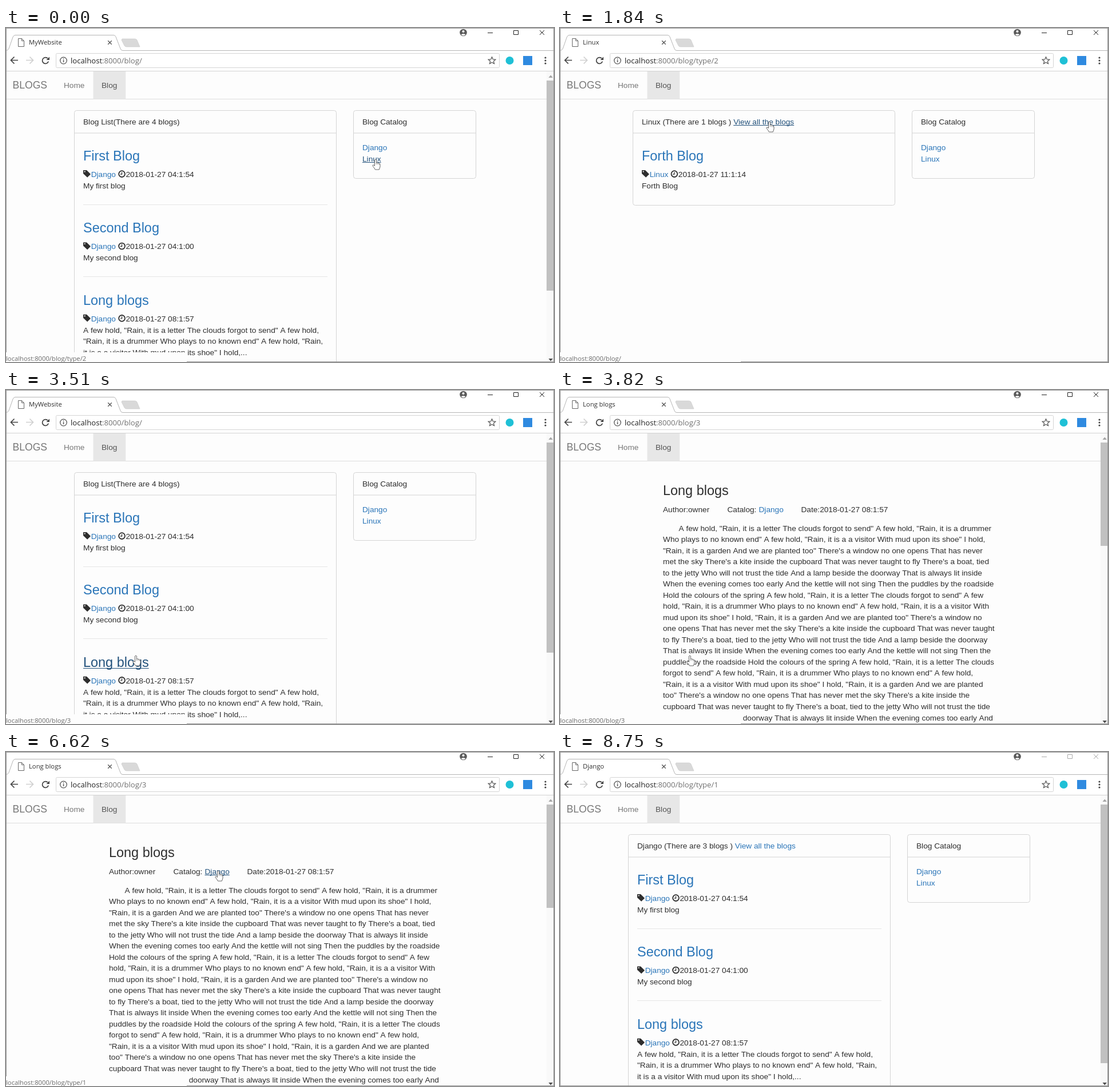
Recreate the animation shown at these times as an HTML page with a canvas. Size 958 by 585 pixels, loop 8850 ms.

```html
<!DOCTYPE html>
<html lang="en">
<head>
<meta charset="utf-8">
<title>Blog walkthrough</title>
<style>
html, body { margin: 0; width: 100%; height: 100%; overflow: hidden; background: #fdfdfd; }
canvas { display: block; }
</style>
</head>
<body>
<canvas id="stage" width="958" height="585"></canvas>
<script>
const ctx = document.getElementById('stage').getContext('2d');
const LOOP = 8850, BASE = 13.67, LINE = 19.53, BG = '#fdfdfd';
const INK = '#2e2e2e', LINK = '#2a75b8', HOVER = '#23527c', BORDER = '#d4d4d4';
const WEB = '"Liberation Sans", Arial, sans-serif', UI = '"Open Sans", sans-serif';
const HOST = 'localhost:8000', LOADING = 'Connecting...';

const verse = 'A few hold, "Rain, it is a letter The clouds forgot to send" A few hold, ' +
  '"Rain, it is a drummer Who plays to no known end" A few hold, "Rain, it is a a visitor ' +
  'With mud upon its shoe" I hold, "Rain, it is a garden And we are planted too" There\'s a ' +
  'window no one opens That has never met the sky There\'s a kite inside the cupboard That was ' +
  'never taught to fly There\'s a boat, tied to the jetty Who will not trust the tide And a lamp ' +
  'beside the doorway That is always lit inside When the evening comes too early And the kettle ' +
  'will not sing Then the puddles by the roadside Hold the colours of the spring';

// Timelines: [start, value...], the latest started row counts.
const pages = [[0, 'list'], [140, 'linux'], [2390, 'list'], [3820, 'article'], [6890, 'django']];
const statuses = [
  [0, HOST + '/blog/type/2', 1], [450, HOST + '/blog/type/2', .5], [630, '', 0],
  [1710, HOST + '/blog/', 1], [1960, LOADING, 1], [2550, '', 0],
  [3510, HOST + '/blog/3', 1], [4070, HOST + '/blog/3', .5], [4260, '', 0],
  [6500, HOST + '/blog/type/1', 1], [6630, LOADING, 1], [7317, '', 0]
];
const hovers = [[0, 'Linux'], [1043, ''], [1710, 'View all the blogs'], [2390, ''],
  [3510, 'Long blogs'], [3820, ''], [6220, 'Django'], [6890, '']];
const pointers = [[0, hand], [910, arrow], [1710, hand], [2390, arrow], [3510, hand],
  [4680, beam], [5400, arrow], [6220, hand], [7170, arrow]];
// Pointer moves: [start, end, steps, points]
const moves = [
  [0, 1, 1, [[646, 230]]],
  [910, 1840, 8, [[611, 226], [490, 200], [366, 164]]],
  [2390, 3360, 7, [[366, 164], [300, 325], [227, 465]]],
  [4680, 5560, 7, [[240, 438], [266, 340], [215, 215], [150, 138]]],
  [5710, 6220, 5, [[186, 138], [300, 172], [371, 208]]],
  [7170, 8200, 8, [[395, 225], [620, 400], [880, 592]]]
];
const last = (rows, t) => rows.filter(r => r[0] <= t).pop();

function pointerAt(t) {
  const [start, end, steps, pts] = last(moves, t);
  if (pts.length < 2) return pts[0];
  const step = Math.min(steps - 1, Math.floor((t - start) / (end - start) * (steps - 1) + .001));
  const s = step / (steps - 1) * (pts.length - 1);
  const i = Math.min(pts.length - 2, Math.floor(s));
  return pts[i].map((v, k) => v + (pts[i + 1][k] - v) * (s - i));
}

// Drawing helpers
function text(s, x, y, color = INK, size = BASE, family = WEB) {
  ctx.font = `${size}px ${family}`;
  ctx.fillStyle = color;
  ctx.fillText(s, x, y);
  return x + ctx.measureText(s).width;
}
function link(s, x, y, hovered, size = BASE) {
  const end = text(s, x, y, hovered ? HOVER : LINK, size);
  if (hovered) fill(HOVER, x, Math.round(y + size * .1), end - x, 1);
  return end;
}
function fill(color, x, y, w, h) {
  ctx.fillStyle = color;
  ctx.fillRect(x, y, w, h);
}
function shape(d, x, y, fillColor, strokeColor, width = 1) {
  const path = new Path2D(d);
  ctx.save();
  ctx.translate(x, y);
  if (fillColor) { ctx.fillStyle = fillColor; ctx.fill(path); }
  if (strokeColor) { ctx.strokeStyle = strokeColor; ctx.lineWidth = width; ctx.stroke(path); }
  ctx.restore();
}
function circle(x, y, r, fillColor, strokeColor, width = 1, from = 0, to = 7) {
  ctx.beginPath();
  ctx.arc(x, y, r, from, Math.min(to, from + 2 * Math.PI));
  if (fillColor) { ctx.fillStyle = fillColor; ctx.fill(); }
  if (strokeColor) { ctx.strokeStyle = strokeColor; ctx.lineWidth = width; ctx.stroke(); }
}
function box(x, y, w, h, r) {
  ctx.beginPath();
  ctx.roundRect(x, y, w, h, r);
  ctx.strokeStyle = BORDER;
  ctx.lineWidth = 1;
  ctx.stroke();
}
function wrap(s, width, indent = 0) {
  ctx.font = `${BASE}px ${WEB}`;
  const lines = [];
  let line = '', room = width - indent;
  for (const word of s.split(' ')) {
    const next = line ? line + ' ' + word : word;
    if (ctx.measureText(next).width > room) {
      lines.push(line);
      line = word;
      room = width;
    } else line = next;
  }
  return [...lines, line];
}
const excerpt = wrap(verse.slice(0, 191) + '...', 427);
const article = wrap(Array(4).fill(verse).join(' '), 580, 27.5).slice(0, 18);

// Pointers
function arrow(x, y) {
  shape('M.5 .5V13.5L3.4 10.8L5.6 15.4L7.4 14.6L5.3 10H9.2Z', x, y, '#fff', '#555', .9);
}
function hand(x, y) {
  shape('M-1.5 9V1Q0 -1 1.4 1V6Q3 5 4 6.6Q5.6 5.8 6.4 7.3Q8 7 8 9V13L6.3 18H-.6' +
    'Q-2 15-5 11.5Q-5 9.2-3 10L-1.5 11.5Z', x, y, '#fff', '#555', .9);
  shape('M1.4 6V9M4 6.6V9.4M6.4 7.3V9.6', x, y, null, '#777', .8);
}
function beam(x, y) {
  shape('M-3-7.5H3M0-7.5V7.5M-3 7.5H3', x, y, null, '#555');
}

// Browser window
function chrome(title, path, loading, inactive) {
  fill('#fff', 0, 0, 958, 76);
  shape('M0 39.5Q4 39 5 36L12 16Q13.5 12.5 16 12.5H188Q191 12.5 192 15.5L200 36' +
    'Q201 39.5 204 39.5H958', 0, 0, null, '#b5b5b5');
  shape('M203 19H225Q228 19 229 21L234 33H211Q208 33 207 31L202 21Z', 0, 0, '#d9d9d9', '#c8c8c8', .6);
  if (loading) circle(26, 25, 5.5, null, '#888', 1.6, -loading, 3.6 - loading);
  else shape('M21.5 18.5H27.5L31.5 22.5V32.5H21.5ZM27.5 18.5V22.5H31.5', 0, 0, '#fff', '#666');
  text(title, 40, 29, INK, 11.25, UI);
  shape('M-3.3-3.3L3.3 3.3M3.3-3.3L-3.3 3.3', 181.5, 25.5, null, '#555', 1.3);

  const frame = inactive ? '#aaa' : '#222';
  circle(799.5, 8, 6.3, '#5a5a5a');
  circle(799.5, 6, 2.1, '#fff');
  shape('M-4 3.8Q0 .2 4 3.8Q0 7 -4 3.8Z', 799.5, 8, '#fff');
  shape('M842 8.5H851M887.5 4.5H895.5V11.5H887.5ZM933 4L941 12M941 4L933 12', 0, 0, null, frame);

  shape('M21 56.5H9M14.5 50.5L8.5 56.5L14.5 62.5', 0, 0, null, '#444', 1.7);
  shape('M35 56.5H47M41.5 50.5L47.5 56.5L41.5 62.5', 0, 0, null, '#d0d0d0', 1.7);
  circle(69, 57, 5.4, null, '#444', 1.7, .3, 5.5);
  shape('M76 50.5V56H70.5Z', 0, 0, '#444');
  box(87.5, 44.5, 775, 25, 2);
  circle(100.5, 57, 5.8, null, '#555', 1.3);
  fill('#555', 99.8, 56, 1.5, 4);
  fill('#555', 99.8, 53.4, 1.5, 1.5);
  text(path, text(HOST.slice(0, 9), 113, 61.5, '#222', 13.15, UI), 61.5, '#717171', 13.15, UI);
  shape('M0-6.3L1.8-2.1L6.3-1.8L2.9 1.2L4 5.6L0 3.2L-4 5.6L-2.9 1.2L-6.3-1.8L-1.8-2.1Z',
    849.5, 57, null, '#555', 1.2);
  circle(880.5, 57, 7, '#1fc0d6');
  fill('#2f8ae0', 904, 49, 16, 16);
  for (const y of [52, 57, 62]) circle(943, y, 1.6, '#444');
  fill('#d2d2d2', 0, 75, 958, 1);
}

function scrollbar(bottom) {
  fill('#f9f9f9', 945, 76, 12, 508);
  fill('#c1c1c1', 945, 92, 12, bottom - 92);
  shape('M948.5 87H956L952.2 82.5Z', 0, 0, '#a5a5a5');
  shape('M948.5 579H956L952.2 583.5Z', 0, 0, '#505050');
}

function navbar() {
  fill('#dedede', 0, 124, 958, 1);
  fill('#e7e7e7', 152.5, 76, 56.7, 48.5);
  text('BLOGS', 11.5, 106, '#777', 17.58);
  text('Home', 101, 105, '#777');
  text('Blog', 167, 105, '#555');
}

// Pages
function post(x, y, title, tag, date, body, hover) {
  link(title, x, y, hover === title, 23.44);
  shape('M0 0H6L13 7L7.2 12.8L0 6Z', x, y + 17, INK);
  circle(x + 2.7, y + 19.6, 1.1, BG);
  const end = link(tag, x + 13.67, y + 29) + 3.8;
  circle(end + 6.8, y + 23.6, 5.4, null, INK, 1.8);
  shape('M0-3.4V.6H-2.8', end + 6.8, y + 23.6, null, INK, 1.2);
  text(date, end + 13.67, y + 29);
  body.forEach((line, i) => text(line, x, y + 49 + i * LINE));
}

function listPage(x, heading, all, posts, bottom, hover) {
  box(x - 15.5, 144.5, 458, bottom - 144.5, 4);
  fill(BORDER, x - 15, 183.5, 457, 1);
  const end = text(heading, x, 169);
  if (all) link('View all the blogs', end, 169, hover === 'View all the blogs');
  posts.forEach((p, i) => {
    const y = 232 + i * 126.4;
    post(x, y, ...p, hover);
    if (i < posts.length - 1) fill('#e6e6e6', x, Math.round(y + 77), 427, 1);
  });
  box(x + 472.5, 144.5, 214, 119, 4);
  fill(BORDER, x + 473, 183.5, 213, 1);
  text('Blog Catalog', x + 488, 169);
  link('Django', x + 488, 214);
  link('Linux', x + 488, 233.5, hover === 'Linux');
}

function articlePage(hover) {
  text('Long blogs', 180, 184, INK, 23.44);
  text('Author:owner', 180, 213.5);
  text('Catalog:', 292.5, 213.5);
  link('Django', 347.5, 213.5, hover === 'Django');
  text('Date:2018-01-27 08:1:57', 421.5, 213.5);
  article.forEach((line, i) => text(line, i ? 180 : 207.5, 246.5 + i * LINE));
}

const posts = [
  ['First Blog', 'Django', '2018-01-27 04:1:54', ['My first blog']],
  ['Second Blog', 'Django', '2018-01-27 04:1:00', ['My second blog']],
  ['Long blogs', 'Django', '2018-01-27 08:1:57', excerpt]
];
const forth = [['Forth Blog', 'Linux', '2018-01-27 11:1:14', ['Forth Blog']]];

// Tab title, path, scrollbar end, content
const views = {
  list: ['MyWebsite', '/blog/', 460,
    h => listPage(135, 'Blog List(There are 4 blogs)', false, posts, 700, h)],
  linux: ['Linux', '/blog/type/2', 0,
    h => listPage(143, 'Linux (There are 1 blogs ) ', true, forth, 310.5, h)],
  article: ['Long blogs', '/blog/3', 273, articlePage],
  django: ['Django', '/blog/type/1', 545,
    h => listPage(135, 'Django (There are 3 blogs ) ', true, posts, 700, h)]
};

function draw(t) {
  const [title, path, thumb, content] = views[last(pages, t)[1]];
  const [, status, alpha] = last(statuses, t);
  const loadStart = [1960, 6630].find((s, i) => t >= s && t < [2390, 6890][i]);
  fill(BG, 0, 0, 958, 585);
  navbar();
  content(last(hovers, t)[1]);
  if (thumb) scrollbar(thumb);
  chrome(title, ':8000' + path, loadStart && 1 + Math.floor((t - loadStart) / 140), t >= 8750);
  ctx.strokeStyle = '#999';
  ctx.lineWidth = 1;
  ctx.strokeRect(.5, .5, 957, 584);
  if (status) {
    ctx.globalAlpha = alpha;
    fill(BG, 0, 568, 316, 17);
    text(status, 0, 583, '#6a6a6a', 11.25, UI);
    ctx.globalAlpha = 1;
  }
  last(pointers, t)[1](...pointerAt(t));
}

function tick() {
  draw(performance.now() % LOOP);
  requestAnimationFrame(tick);
}
tick();
</script>
</body>
</html>
```
